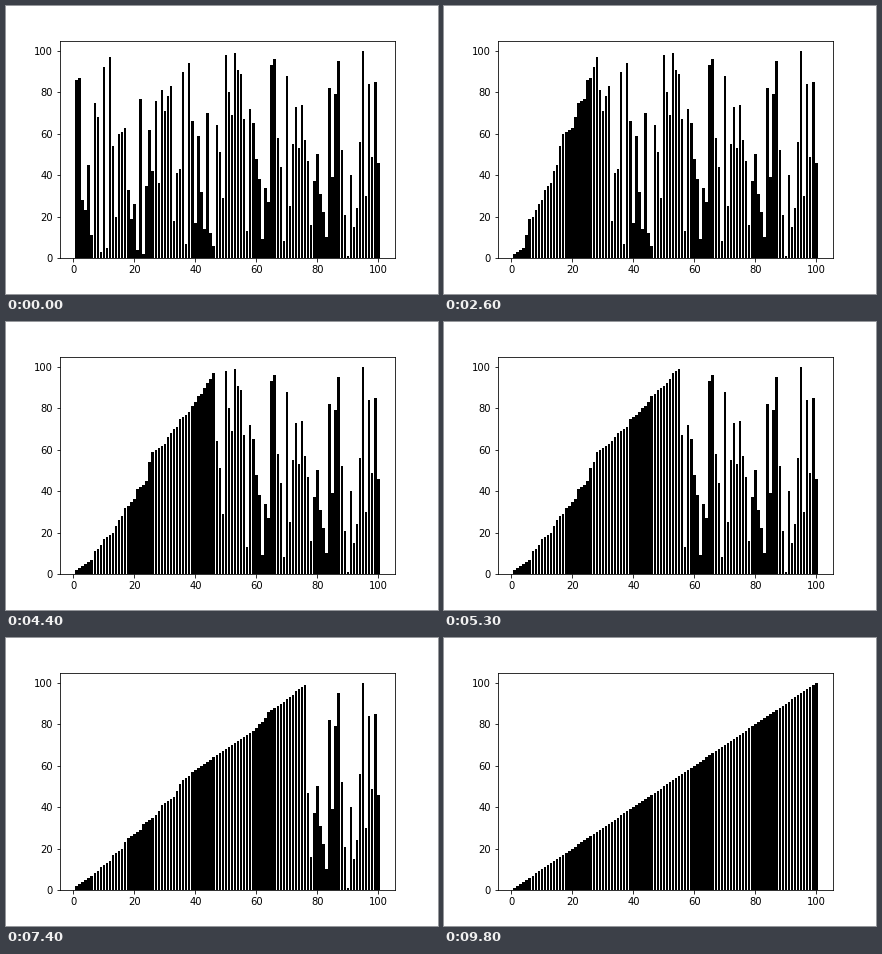
Write a matplotlib script that moves like this. It is 432 px wide and 288 px high and loops after 9900 ms.

```python
import matplotlib.pyplot as plt
from matplotlib.animation import FuncAnimation

VALUES = [
    86, 87, 28, 23, 45, 11, 75, 68, 3, 92,
    5, 97, 54, 20, 60, 61, 63, 33, 19, 26,
    4, 77, 2, 35, 62, 42, 76, 36, 81, 71,
    78, 83, 18, 41, 43, 90, 7, 94, 66, 17,
    59, 32, 14, 70, 12, 6, 64, 51, 29, 98,
    80, 69, 99, 91, 89, 67, 13, 72, 65, 48,
    38, 9, 34, 27, 93, 96, 58, 44, 8, 88,
    25, 55, 73, 53, 74, 57, 47, 16, 37, 50,
    31, 22, 10, 82, 39, 79, 95, 52, 21, 1,
    40, 15, 24, 56, 100, 30, 84, 49, 85, 46,
]
STEP_MS = 100


def insertion_state(step):
    """Values once the first step + 2 items have been insertion-sorted."""
    n = step + 2
    return sorted(VALUES[:n]) + VALUES[n:]


plt.rcParams["toolbar"] = "None"
plt.rcParams["font.family"] = "DejaVu Sans"

fig, ax = plt.subplots(figsize=(6, 4), dpi=72, facecolor="white")
fig.subplots_adjust(left=0.125, right=0.9, bottom=0.125, top=0.88)
bars = ax.bar(range(1, len(VALUES) + 1), insertion_state(0), color="black")
ax.set_xlim(ax.get_xlim())
ax.set_ylim(0, 105)
ax.set_xticks(range(0, 101, 20))
ax.set_yticks(range(0, 101, 20))


def update(step):
    for bar, value in zip(bars, insertion_state(step)):
        bar.set_height(value)
    return bars.patches


anim = FuncAnimation(fig, update, frames=len(VALUES) - 1,
                     interval=STEP_MS, repeat=True, repeat_delay=0)
plt.show()
```
